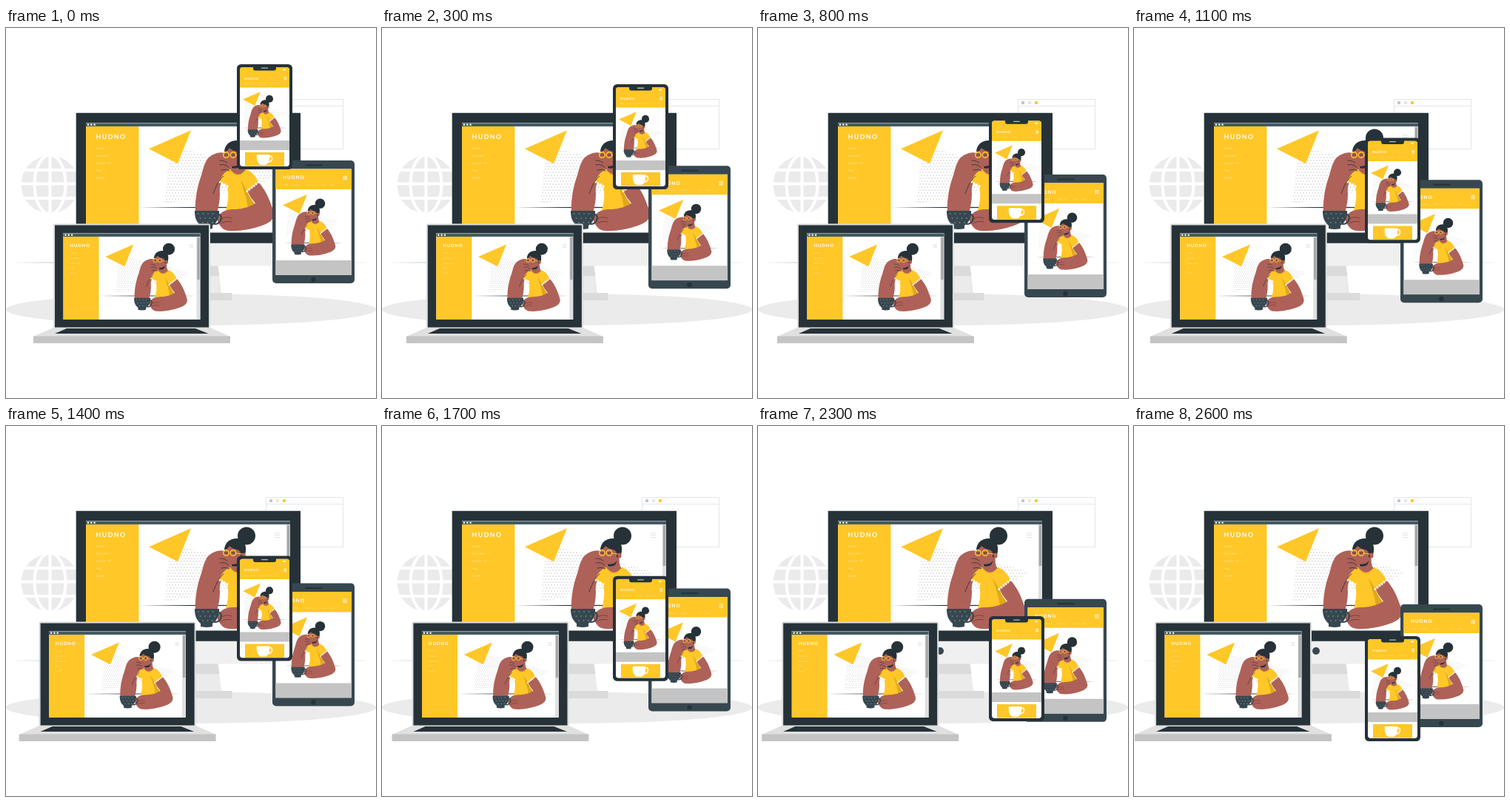
These frames come from a looping animation (500x500 px, 4.6 s). An HTML page with a canvas:

```html
<!DOCTYPE html>
<html lang="en">
<head>
<meta charset="utf-8">
<title>Responsive devices</title>
<style>
  html, body { margin: 0; width: 100%; height: 100%; overflow: hidden; background: #fff; }
  canvas { display: block; width: 100vw; height: 100vh; }
</style>
</head>
<body>
<canvas id="stage"></canvas>
<script>
const canvas = document.getElementById('stage');
const g = canvas.getContext('2d');
const dpr = window.devicePixelRatio || 1;
canvas.width = canvas.height = 500 * dpr;

const LOOP = 4600, STEP = 100, STEPS = 26;
const DARK = '#263238', SLATE = '#37474f', YELLOW = '#ffc727', OCHRE = '#dfa81c';
const SKIN = '#ae6158', PALE = '#ebebeb', MID = '#dbdbdb', GREY = '#c4c4c4';
const BRAND = 'HUDNO';
const MENU = ['HOME', 'GALLERY', 'ABOUT US', 'FAQ', 'SHOP'];

function rect(x, y, w, h, color, r = 0) {
  g.fillStyle = color;
  g.beginPath();
  g.roundRect(x, y, w, h, r);
  g.fill();
}

function oval(x, y, rx, ry, color) {
  g.fillStyle = color;
  g.beginPath();
  g.ellipse(x, y, rx, ry, 0, 0, 7);
  g.fill();
}

const dot = (x, y, r, color) => oval(x, y, r, r, color);

function ring(x, y, r, color, width) {
  g.strokeStyle = color;
  g.lineWidth = width;
  g.beginPath();
  g.arc(x, y, r, 0, 7);
  g.stroke();
}

function shape(d, color) {
  g.fillStyle = color;
  g.fill(new Path2D(d));
}

function stroke(d, color, width = 1) {
  g.strokeStyle = color;
  g.lineWidth = width;
  g.lineCap = 'round';
  g.stroke(new Path2D(d));
}

function label(text, x, y, size, color, weight = 400, gap = 0.1) {
  g.font = `${weight} ${size}px Lato, "Open Sans", sans-serif`;
  g.letterSpacing = size * gap + 'px';
  g.textRendering = 'geometricPrecision';
  g.textBaseline = 'middle';
  g.fillStyle = color;
  g.fillText(text, x, y);
}

const brand = (x, y, size) => label(BRAND, x, y, size, '#fff', 700, 0.16);

function group(draw, x = 0, y = 0, s = 1) {
  g.save();
  g.translate(x, y);
  g.scale(s, s);
  draw();
  g.restore();
}

function clipRect(x, y, w, h, r = 0) {
  g.beginPath();
  g.roundRect(x, y, w, h, r);
  g.clip();
}

function burger(x, y, w, color, gap) {
  for (let i = 0; i < 3; i++) rect(x, y + i * gap, w, Math.max(0.8, gap * 0.32), color);
}

// Thin line that fades at both ends
function taperLine(x1, x2, y, h, color) {
  const mid = (x1 + x2) / 2;
  shape(`M${x1} ${y}L${mid} ${y - h / 2}L${x2} ${y}L${mid} ${y + h / 2}Z`, color);
}

// Dotted field, placed by its right tip
function dots(x, y, s) {
  group(() => {
    g.clip(new Path2D('M-145 -38L0 0L-27 17L-153 41Z'));
    g.fillStyle = '#c6c6c6';
    g.beginPath();
    for (let row = 0; row < 21; row++) {
      for (let px = -154 + (row % 2) * 2; px < 2; px += 4) {
        const py = -38 + row * 4;
        g.moveTo(px + 0.8, py);
        g.arc(px, py, 0.8, 0, 7);
      }
    }
    g.fill();
  }, x, y, s);
}

// Paper-plane triangle, placed by its left corner
const plane = (x, y, s) => group(() => shape('M0 0L57 -25L39 20Z', YELLOW), x, y, s);

function mug() {
  stroke('M286 252C293 250 293 265 282 265', SLATE, 2.2);
  shape('M255 247H288C289 256 285 263 279 267L279 271Q271 273 263 271L263 267C257 262 255 256 255 247Z', SLATE);
  for (let i = 0; i < 12; i++) {
    const row = Math.floor(i / 4);
    dot(260 + (i % 4) * 6.5 + (row % 2) * 2.5 - (row === 2 ? 0.5 : 0), 251 + row * 6, 0.8, '#8fa3ad');
  }
}

// Seated figure, placed by the centre of the hair bun
function woman(x, y, s) {
  group(() => {
    g.translate(-325, -149);
    dot(325, 148.5, 12, DARK);
    // neck and face
    shape('M307 180L321 174C320 184 321 190 325 194L314 206L303 194Z', SKIN);
    shape('M305 186Q312 188 318 182L315 188Q310 191 305 189Z', DARK);
    shape('M297 162C294 172 295 182 300 186C307 189 315 184 318 177L323 172L318 158Z', SKIN);
    shape('M295 167C296 156 304 151 314 152C323 154 326 163 323 174C321 177 319 178 317 177C318 171 316 168 312 167C307 166 304 164 302 162C300 165 298 167 295 167Z', DARK);
    oval(321, 175, 2.6, 3.6, SKIN);
    // raised arm
    shape('M256 250C255 230 259 213 264 199C267 188 269 180 274 175C281 169 289 167 295 169C299 172 302 180 305 186C305 192 300 197 295 200C290 208 288 216 289 225C289 234 287 242 285 250Z', SKIN);
    // shirt
    shape('M303 191C296 193 291 200 288 208L299 214C301 222 301 234 297 246C309 248 325 246 337 239C332 233 328 226 326 220L341 208C337 200 332 193 324 191Q314 205 303 191Z', YELLOW);
    shape('M317 205C321 219 326 232 327 244L337 239C332 233 328 226 325 219Z', OCHRE);
    stroke('M304 193Q313 205 324 192', OCHRE, 1);
    // resting arm and hand
    shape('M341 208C352 220 358 236 362 250C363 258 357 263 346 267C332 272 314 275 302 274C295 274 291 270 288 265C284 260 286 255 290 251C294 246 301 245 311 245C322 244 331 241 337 237Q330 229 326 220Z', SKIN);
    for (let i = 0; i < 6; i++) dot(326 + i * 3, 220.5 - i * 2.4, 1.6, '#fff');
    for (let i = 0; i < 4; i++) dot(288.5 + i * 3.5, 208 + i * 1.8, 1.5, '#fff');
    stroke('M291 258Q298 254 305 257M291 264Q297 260 305 262', '#6f3531', 0.8);
    // hand against the face
    stroke('M289 179Q294 178 299 182M289 185Q295 183 301 188M291 192Q297 190 302 193', DARK, 0.8);
    stroke('M294 200C288 205 284 213 280 224', DARK, 0.8);
    for (const gx of [297.5, 307]) {
      ring(gx, 171.5, 3.8, YELLOW, 1.4);
      stroke(`M${gx - 1.7} 171.5h3.4`, DARK, 0.8);
    }
    stroke('M311 172L319 173', YELLOW, 1);
    mug();
  }, x, y, s);
}

function browserBar(x, y, w, h) {
  rect(x, y, w, h, '#455a64');
  rect(x, y, w, 0.7, '#b0bec5');
  for (let i = 0; i < 3; i++) dot(x + 3 + i * 4.3, y + h / 2 + 0.2, 1.2, '#fff');
}

function sideMenu(x, y, gap, size) {
  MENU.forEach((word, i) => label(word, x, y + i * gap, size, '#ffe7a6'));
}

function topMenu(x, y, size, s) {
  const at = [0, 13, 31, 52, 64];
  MENU.forEach((word, i) => label(word, x + at[i] * s, y, size, '#ffe49b', 400, 0));
}

function backdrop() {
  rect(0, 0, 500, 500, '#fff');
  oval(250, 380.5, 250, 21.5, PALE);
  taperLine(3, 497, 317, 1.6, '#555e63');

  dot(59.5, 211.5, 39, PALE);
  g.strokeStyle = '#fff';
  g.lineWidth = 4;
  for (const rx of [0.01, 21]) {
    g.beginPath();
    g.ellipse(59.5, 211.5, rx, 40, 0, 0, 7);
    g.stroke();
  }
  for (const y of [192, 210.5, 230]) rect(18, y - 2, 83, 4, '#fff');

  g.strokeStyle = '#e6e6e6';
  g.lineWidth = 1;
  g.strokeRect(351.5, 96.5, 104, 67);
  rect(351, 105, 105, 1, '#e6e6e6');
  [GREY, '#e6e6e6', YELLOW].forEach((c, i) => dot(358 + i * 9, 101, 2.3, c));
}

function monitor() {
  shape('M204 321H286.500L291 358H200Z', PALE);
  shape('M204 321H286.500L288.300 335H202Z', MID);
  rect(187, 358, 118.500, 10, MID);
  rect(95, 288, 303, 33.500, '#f0f0f0', [0, 0, 3, 3]);
  dot(246, 304, 5, SLATE);
  rect(94.7, 114.8, 303.3, 176, DARK);
  group(() => {
    clipRect(108, 128, 276, 148.5);
    rect(108, 128, 276, 149, '#fff');
    dots(367, 197, 1);
    plane(193, 163.2, 1);
    taperLine(180, 374, 242.5, 1.4, DARK);
    woman(325, 149, 1);
    rect(379, 133, 5, 144, '#e0e0e0');
    rect(379.7, 134, 3.6, 55, '#a6a6a6');
    burger(363, 144.5, 7, MID, 2.7);
    rect(108, 133, 71.5, 144, YELLOW);
    brand(121.5, 147.5, 8.8);
    sideMenu(121.5, 163, 10, 3.6);
    browserBar(108, 128, 276, 5);
  });
}

function laptop() {
  rect(64, 264.5, 212, 141, MID, 2);
  rect(66, 266.5, 208, 138, DARK);
  group(() => {
    clipRect(77.5, 277, 185, 117);
    rect(77, 277, 186, 117, '#fff');
    dots(249, 331, 0.66);
    plane(134.3, 309, 0.665);
    taperLine(125, 258, 362, 1.1, DARK);
    woman(220, 299, 0.67);
    rect(257.5, 282, 5, 112, '#e0e0e0');
    rect(258.3, 283, 3.4, 57, '#a6a6a6');
    burger(248, 292, 5, MID, 2);
    rect(77, 282, 48.5, 112, YELLOW);
    brand(86.5, 294.5, 5.9);
    sideMenu(86.5, 304.5, 6.7, 2.5);
    browserBar(77.5, 277, 185, 5);
  });
  shape('M64 405H276L303 417H37Z', '#e0e0e0');
  shape('M82 406H256L273.500 413H66Z', DARK);
  rect(37, 416.5, 266, 9.5, GREY);
}

function tablet() {
  rect(360, 179, 111, 166, SLATE, 5);
  rect(404, 184.5, 23.5, 2, DARK, 1);
  dot(415.5, 339.8, 3.2, DARK);
  group(() => {
    clipRect(364.5, 190.5, 102.3, 143.5);
    rect(364, 190, 104, 144, '#fff');
    dots(450, 261, 0.47);
    plane(374, 239.3, 0.58);
    taperLine(376, 456, 290.5, 1, DARK);
    woman(424.5, 237.5, 0.56);
    rect(364, 314, 104, 20, GREY);
    rect(364, 190, 104, 28, YELLOW);
    brand(374, 202.5, 6.4);
    burger(455, 200, 6, '#fff', 2.1);
    topMenu(374, 212.5, 2.4, 1);
  });
}

function phone() {
  rect(312, 49, 75, 142, DARK, 5.5);
  group(() => {
    clipRect(316, 53, 67, 134, 4);
    rect(316, 53, 67, 134, '#fff');
    dots(379, 114, 0.38);
    plane(320, 96.5, 0.42);
    taperLine(319, 380, 135, 0.9, DARK);
    woman(356, 96, 0.42);
    rect(316, 152, 67, 13, GREY);
    rect(323, 168, 53, 18.5, YELLOW);
    shape('M339 171H356C357 178 355 183 351 185H344C340 183 338 178 339 171Z', '#fff');
    stroke('M356 173C361 172 361 181 354 181', '#fff', 1.5);
    rect(316, 53, 67, 27.5, YELLOW);
    brand(322, 68.5, 4.2);
    burger(375.3, 66.2, 4, '#fff', 1.6);
    topMenu(321, 75.5, 1.8, 0.68);
    rect(374, 55.6, 4, 1.8, '#fff', 0.6);
  });
  rect(334, 50, 31, 7.5, DARK, [0, 0, 3, 3]);
  rect(345, 53.5, 9, 1.3, '#b0bec5', 0.6);
}

function frame(now) {
  const p = Math.min(STEPS, Math.floor((now % LOOP) / STEP)) / STEPS;
  g.setTransform(canvas.width / 500, 0, 0, canvas.height / 500, 0, 0);
  backdrop();
  monitor();
  group(laptop, -36 * p, 0);
  group(tablet, 0, 62 * p);
  group(phone, 0, 235 * p);
  requestAnimationFrame(frame);
}
requestAnimationFrame(frame);
</script>
</body>
</html>
```
